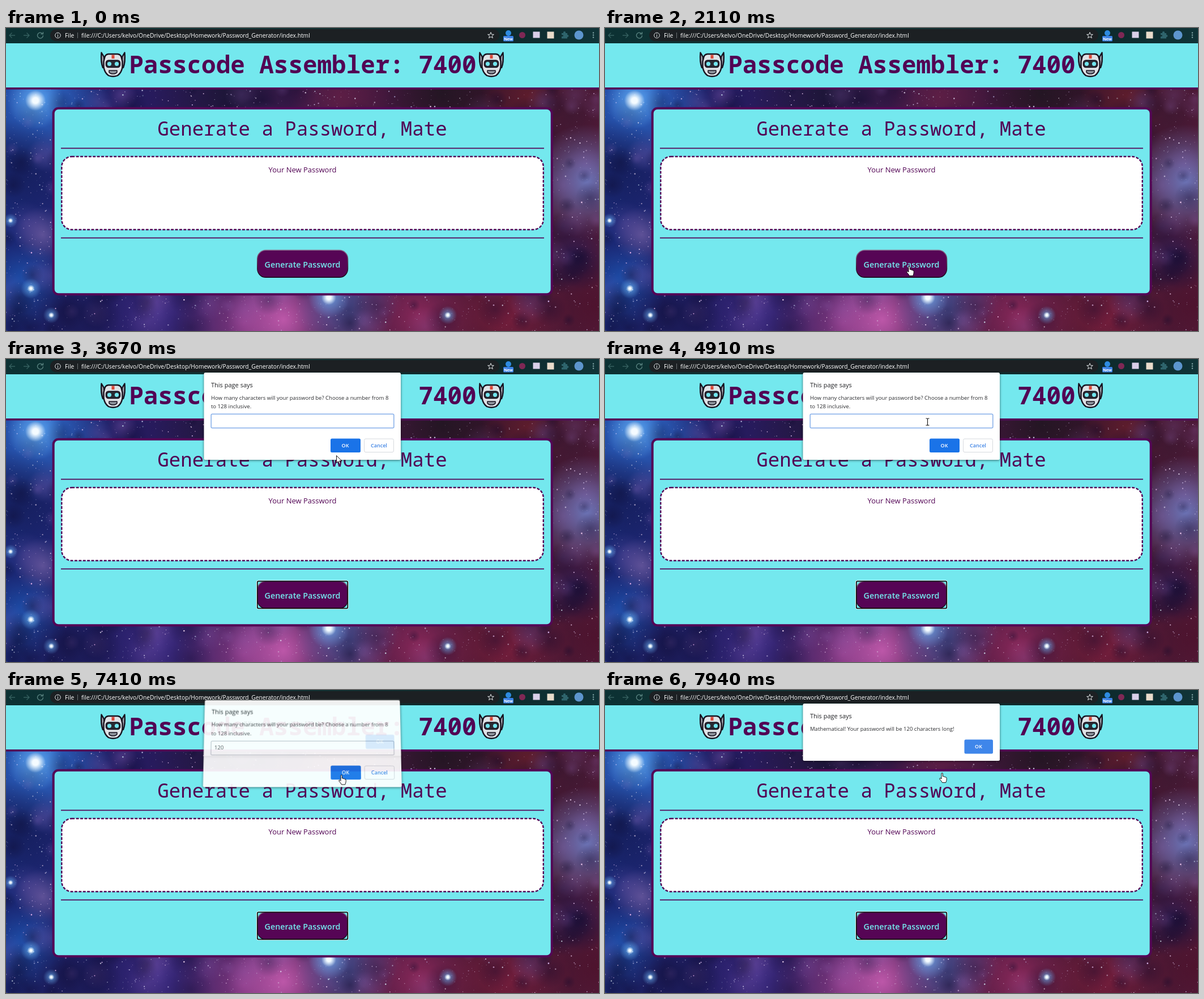
An HTML page with a canvas that plays this animation: 1047 px wide and 535 px high, repeating every 8000 ms.

```html
<!DOCTYPE html>
<html lang="en">
<head>
<meta charset="utf-8">
<title>Password page</title>
<style>
  html, body { margin: 0; width: 100%; height: 100%; overflow: hidden; background: #1a1a4a; }
  main { position: relative; width: 100%; height: 100%; overflow: hidden; contain: strict; }
  canvas, svg { position: absolute; left: 0; top: 0; width: 1047px; height: 535px; }
  text { font-family: "Open Sans", "Noto Sans", sans-serif; }
  .mono { font-family: "Noto Sans Mono", "DejaVu Sans Mono", monospace; fill: #520454; }
  .mid { text-anchor: middle; }
  .small { font-size: 9.55px; fill: #2b2c2f; }
  .title { font-size: 11px; fill: #202124; }
  .label { font-size: 9px; font-weight: 600; text-anchor: middle; }
  .box { fill: #fff; filter: drop-shadow(0 1px 2px rgba(0, 0, 0, .55)); }
  #prompt { transform-origin: 523px 101px; }
  #notice { transform-origin: 523px 75px; }
</style>
</head>
<body>
<main>
<canvas id="sky" width="1047" height="535"></canvas>

<svg id="page" viewBox="0 0 1047 535">
  <defs>
    <linearGradient id="bar"><stop stop-color="#0c3133"/><stop offset=".4" stop-color="#123536"/><stop offset=".8" stop-color="#0d2729"/><stop offset="1" stop-color="#103438"/></linearGradient>
    <linearGradient id="bevel" x2="0" y2="1"><stop stop-color="#8b6a8b"/><stop offset=".5" stop-color="#4b2c4b"/><stop offset="1" stop-color="#120012"/></linearGradient>
    <g id="robot" stroke="#17121f" stroke-width="2.4" stroke-linejoin="round">
      <path d="M1.500 1.500L6 9L7 28H4Q0 18 1.500 1.500ZM42.500 1.500L38 9L37 28H40Q44 18 42.500 1.500Z" fill="#9fa3ab"/>
      <path d="M7.500 9Q9 4.500 14 4H30Q35 4.500 36.500 9L38.500 17V27Q37 37 30 42Q22 45 14 42Q7 37 5.500 27V17Z" fill="#dfe2e6"/>
      <path d="M19.500 5.500H24.500V12H19.500Z" fill="#d94a3a" stroke="none"/>
      <rect x="9.500" y="15" width="25" height="12.500" rx="4.500" fill="#292a33" stroke-width="1.500"/>
      <path d="M15 33H29V36Q27 39 22 39T15 36Z" fill="#8d939c" stroke-width="1.500"/>
      <g fill="#71e5ee" stroke="none"><circle cx="15.500" cy="21.300" r="3.600"/><circle cx="28.500" cy="21.300" r="3.600"/></g>
    </g>
  </defs>

  <path d="M0 0H1047V27H0Z" fill="url(#bar)"/>
  <rect x="78" y="2" width="793" height="21.500" rx="10.700" fill="#1c2023"/>
  <g fill="none" stroke="#35605f" stroke-width="1.300">
    <path d="M16 13H6M10.500 8.500L6 13L10.500 17.500M31 13H41M36.500 8.500L41 13L36.500 17.500"/>
    <path d="M64 9.500A5 5 0 1 0 65.500 13M65.500 7V10.500H61.500" stroke="#5b8582"/>
  </g>
  <g fill="none" stroke="#dfe3e5">
    <circle cx="91.500" cy="13" r="4.800"/>
    <path d="M91.500 12V16M91.500 9.800V11"/>
    <path d="M126.500 8V18" stroke="#6b7073"/>
    <path d="M856 7.500L857.400 11.300L861.400 11.400L858.300 13.900L859.400 17.700L856 15.500L852.600 17.700L853.700 13.900L850.600 11.400L854.600 11.300Z"/>
  </g>
  <g font-size="10.250" fill="#fff">
    <text x="104" y="16.500">File</text>
    <text x="133" y="16.500">file:///C:/Users/kelvo/OneDrive/Desktop/Homework/Password_Generator/index.html</text>
  </g>
  <circle cx="887" cy="9" r="5" fill="#2d8be0"/>
  <rect x="878" y="14" width="18" height="9.500" rx="1.500" fill="#3b82e6"/>
  <text class="mid" x="887" y="21.500" font-size="7" font-weight="700" fill="#fff">New</text>
  <circle cx="911.500" cy="12.500" r="5.500" fill="#7e2855"/>
  <rect x="930.500" y="6.500" width="12" height="11" fill="#d9cfe9"/>
  <rect x="955.500" y="6.500" width="12" height="12" fill="#e9dccb"/>
  <path d="M981 9H984Q983.500 6 986 6T988 9H991V12Q993.500 12 993.500 14T991 16V18.500H981V15Q984 15 984 13.500T981 12Z" fill="#2e646c"/>
  <circle cx="1011.500" cy="12.500" r="8" fill="#5d95cd"/>
  <g fill="#7fa3a5"><circle cx="1037" cy="8.500" r="1.200"/><circle cx="1037" cy="12.500" r="1.200"/><circle cx="1037" cy="16.500" r="1.200"/></g>

  <path d="M0 27H1047V105H0Z" fill="#74e8ee"/>
  <path d="M0 106.700H1047" stroke="#530556" stroke-width="3.600"/>
  <text class="mono mid" x="524" y="79.500" font-size="42.600" font-weight="700">Passcode Assembler: 7400</text>
  <use href="#robot" x="167" y="42"/>
  <use href="#robot" x="835" y="42"/>

  <rect x="83.700" y="141.700" width="880" height="328.500" rx="9" fill="#74e8ee" stroke="#530556" stroke-width="4"/>
  <text class="mono mid" x="523" y="190" font-size="34.100">Generate a Password, Mate</text>
  <path d="M97 212.300H950M97 370.600H950" stroke="#530556" stroke-width="1.700"/>
  <rect x="98.300" y="227" width="850.500" height="129" rx="18" fill="#fff" stroke="#530556" stroke-width="2.400" stroke-dasharray="4.900 2.500"/>
  <text class="mid" x="523.500" y="255" font-size="13" fill="#520454">Your New Password</text>

  <rect x="443.800" y="392.300" width="159.700" height="48" rx="15" fill="#560555" stroke="url(#bevel)" stroke-width="1.500"/>
  <g id="focus" fill="none">
    <rect x="442.500" y="391" width="162" height="50.500" rx="3" stroke="#fff"/>
    <rect x="443.800" y="392.300" width="159.500" height="48" rx="2" stroke="#101010" stroke-width="1.800"/>
  </g>
  <text class="mid" x="523.500" y="422.500" font-size="14.300" font-weight="600" fill="#74e8ee">Generate Password</text>
</svg>

<svg id="prompt" viewBox="0 0 1047 535">
  <rect class="box" x="349.500" y="24" width="347.500" height="154" rx="2.500"/>
  <text class="title" x="362" y="49.500">This page says</text>
  <text class="small" x="362" y="71.500">How many characters will your password be? Choose a number from 8</text>
  <text class="small" x="362" y="87">to 128 inclusive.</text>
  <rect id="field" x="362.200" y="97.200" width="322.600" height="24.600" rx="2" fill="#fff" stroke-width="1.500"/>
  <text class="small" id="typed" x="368" y="112.500"></text>
  <path id="caret" d="M368.500 103V115" stroke="#111"/>
  <rect x="573" y="140.500" width="53" height="24.500" rx="2.500" fill="#1a73e8"/>
  <text class="label" x="599" y="156" fill="#fff">OK</text>
  <rect x="632.500" y="141" width="52" height="23.500" rx="2.500" fill="#fff" stroke="#d6d9de"/>
  <text class="label" x="658.500" y="156" fill="#3c82e4">Cancel</text>
</svg>

<svg id="notice" viewBox="0 0 1047 535">
  <rect class="box" x="349.500" y="24" width="347.500" height="101" rx="2.500"/>
  <text class="title" x="362" y="49.500">This page says</text>
  <text class="small" x="362" y="71.500">Mathematical! Your password will be 120 characters long!</text>
  <rect x="634.500" y="87.500" width="50.500" height="25" rx="2.500" fill="#3f86ea"/>
  <text class="label" x="659.500" y="103" fill="#fff">OK</text>
</svg>

<svg id="pointers" viewBox="0 0 1047 535">
  <path id="arrow" d="M.5 .5V13.500L3.500 10.700L5.700 15.500L7.800 14.500L5.700 9.900H9.700Z" fill="#fff" stroke="#000" stroke-width=".9"/>
  <path id="hand" d="M-1 11V2Q-1 .5 .2 .5T1.400 2V6.500Q3.400 6 3.900 7.300Q5.400 6.700 6 8Q8.200 7.600 8.200 9.700V12Q8 14.500 6.700 17.500H.5Q-1 14.500 -4 11.500Q-4.700 9.500 -3 9.500Q-2 9.700 -1 11Z" fill="#fff" stroke="#000" stroke-width=".9"/>
  <path id="beam" d="M-3 -6H-1Q0 -6 0 -5Q0 -6 1 -6H3M0 -5V5M-3 6H-1Q0 6 0 5Q0 6 1 6H3" fill="none" stroke="#111" stroke-width="1.100"/>
</svg>
</main>

<script>
const $ = id => document.getElementById(id);

function paintSky() {
  const c = $('sky').getContext('2d');
  const base = c.createLinearGradient(0, 0, 1047, 0);
  ['#1a2a78', '#221b60', '#371a50', '#421840', '#35142b', '#521a38']
    .forEach((color, i) => base.addColorStop(i / 5, color));
  c.fillStyle = base;
  c.fillRect(0, 0, 1047, 535);

  const glow = (x, y, r, color, core = 0) => {
    const g = c.createRadialGradient(x, y, core, x, y, r);
    g.addColorStop(0, color);
    g.addColorStop(1, color.slice(0, 7) + '00');
    c.fillStyle = g;
    c.fillRect(x - r, y - r, 2 * r, 2 * r);
  };
  [
    [60, 125, 130, '#2f72d4'], [20, 250, 90, '#131b55cc'], [65, 365, 50, '#7560a4bb'],
    [35, 455, 75, '#1e5fc0cc'], [110, 520, 120, '#1a184fcc'], [270, 505, 110, '#402f8acc'],
    [420, 520, 120, '#92408fcc'], [490, 515, 100, '#d563bacc'], [600, 490, 90, '#5867b3cc'],
    [730, 510, 120, '#9a2c61cc'], [880, 510, 120, '#84203fcc'], [390, 115, 130, '#15142fbb'],
    [590, 120, 90, '#6b2146aa'], [770, 115, 100, '#1c161ebb'], [920, 118, 80, '#6a1f2aaa'],
    [1000, 150, 80, '#3a1830aa'], [1025, 270, 100, '#6f80c8dd'], [1000, 400, 70, '#251a52bb'],
    [1040, 490, 80, '#4c1029aa']
  ].forEach(blob => glow(...blob));

  let seed = 7;
  const rnd = () => (seed = seed * 16807 % 2147483647) / 2147483647;
  const spot = () => [1047 * rnd(), 108 + 427 * rnd()];
  for (let i = 0; i < 260; i++) {
    glow(...spot(), 10 + 30 * rnd(), i % 2 ? '#0c082a55' : '#a070c82e');
  }
  for (let i = 0; i < 2800; i++) {
    c.fillStyle = `rgba(${200 + 55 * rnd() | 0},${190 + 50 * rnd() | 0},245,${.25 + .7 * rnd()})`;
    c.beginPath();
    c.arc(...spot(), .45 + .9 * rnd() ** 4, 0, 7);
    c.fill();
  }
  [[52, 128, 28], [570, 476, 20], [44, 460, 10], [780, 507, 9], [80, 507, 8], [8, 340, 7]].forEach(([x, y, r]) => {
    glow(x, y, r * 1.8, '#6db4f5bb');
    glow(x, y, r * .65, '#f4fbffff', r * .18);
  });
}

// Progress in n hard steps, the first at a and the last at b.
const steps = (t, a, b, n) =>
  t < a ? 0 : Math.min(n, Math.floor((t - a) / (b - a) * (n - 1)) + 1) / n;

// start, end, steps, control point, end point
const moves = [
  [480, 770, 5, 860, 420, 636, 336],
  [1230, 2030, 11, 440, 450, 536, 421],
  [2110, 2111, 1, 537, 420, 537, 420],
  [3440, 3670, 4, 570, 300, 583, 170],
  [4140, 4680, 8, 660, 130, 563, 111],
  [4830, 4910, 2, 566, 111, 569.5, 111],
  [6790, 7175, 6, 580, 130, 592, 149.5],
  [7940, 7941, 1, 595, 146, 595, 146]
];

function pointerAt(t) {
  let x = 1106, y = 563;
  for (const [a, b, n, cx, cy, ex, ey] of moves) {
    if (t < a) break;
    const p = steps(t, a, b, n), q = 1 - p;
    x = q * q * x + 2 * p * q * cx + p * p * ex;
    y = q * q * y + 2 * p * q * cy + p * p * ey;
  }
  return [x, y];
}

function pointerKind(t, x, y) {
  const over = (l, top, r, b) => x > l && x < r && y > top && y < b;
  if (t < 480) return '';
  if (t < 3440) return over(98, 226, 950, 357) ? 'beam' : over(443, 391, 604, 441) ? 'hand' : 'arrow';
  return over(362, 97, 685, 122) ? 'beam' : over(573, 140, 626, 165) ? 'hand' : 'arrow';
}

function pose(id, opacity, lift) {
  const s = $(id).style;
  s.opacity = Math.max(0, Math.min(1, opacity));
  s.transform = lift ? `translateY(${-lift}px) perspective(800px) rotateX(${lift * .86}deg)` : 'none';
}

function draw(t) {
  $('focus').style.display = t < 2800 ? 'none' : '';

  const opened = steps(t, 2800, 3120, 5);
  const swap = Math.max(0, (Math.round(steps(t, 6790, 7560, 11) * 11) - 8) / 3);
  pose('prompt', swap ? 1 - swap ** 2.3 : (opened - .2) / .75, swap ? 21 * swap : 17.5 * (1 - opened));
  pose('notice', swap ** 1.6, 12.75 * (1 - swap));

  const typed = '120'.slice(0, [5530, 5780, 6310].filter(at => t >= at).length);
  const caretOn = t < 3440 || t >= 3970 && t < 4490 || t >= 5060 && t < 6790;
  $('typed').textContent = typed;
  $('caret').style.display = caretOn ? '' : 'none';
  $('caret').setAttribute('transform', `translate(${5.4 * typed.length})`);
  $('field').setAttribute('stroke', swap ? '#c4c8ce' : '#85aee9');

  const [x, y] = pointerAt(t), kind = pointerKind(t, x, y);
  for (const id of ['arrow', 'hand', 'beam']) {
    $(id).style.display = id === kind ? '' : 'none';
    $(id).setAttribute('transform', `translate(${x} ${y})`);
  }
}

function tick() {
  draw(performance.now() % 8000);
  requestAnimationFrame(tick);
}

paintSky();
tick();
</script>
</body>
</html>
```
